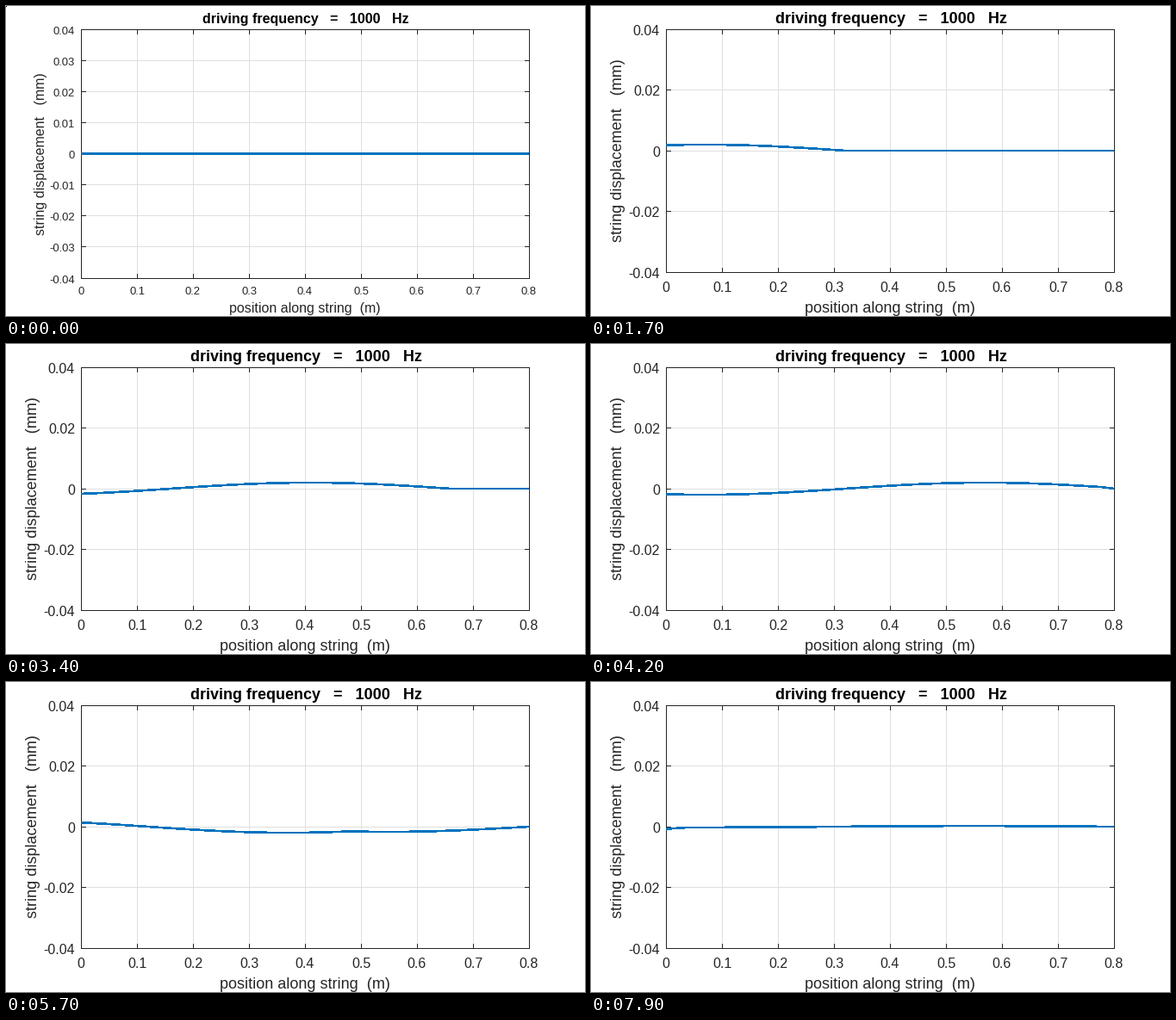
A matplotlib script for the animation above (8 s loop, 672 by 360 pixels).

```python
import numpy as np
import matplotlib.pyplot as plt
from matplotlib.animation import FuncAnimation

plt.rcParams["font.family"] = "Liberation Sans"
plt.rcParams["path.simplify"] = False

W, H, DPI = 672, 360, 96
PT = 72 / DPI                       # points per pixel
LEFT, RIGHT, TOP = 87, 607, 27
INK, GRID, BLUE = "#262626", "#dfdfdf", "#0072bd"

LENGTH, STEP = 0.8, 0.02            # string length, distance travelled per frame (m)
AMP, PERIOD = 0.002, 50             # drive amplitude (mm), period in frames
Y_MAX = 0.04
HALF_WIDTH = 4 / 3                  # half the string's line width in pixels
FRAMES, INTERVAL = 80, 100

fig = plt.figure(figsize=(W / DPI, H / DPI), dpi=DPI, facecolor="white")
ax = fig.add_axes([0, 0, 1, 1])
ax.set(xlim=(0, W), ylim=(H, 0))
ax.axis("off")


def segment(x, y, color, z):
    """One-pixel line between two pixels, both included."""
    return ax.plot(np.add(x, 0.5), np.add(y, 0.5), color=color, lw=PT, zorder=z,
                   snap=False, solid_capstyle="projecting")[0]


def label(x, y, s, size, color=INK, **kw):
    kw = {"ha": "center", "va": "baseline", **kw}
    return ax.text(x, y, s, fontsize=size * PT, color=color, zorder=5, **kw)


def build_axes(bottom, dy, tick_size, label_size, tick_y, label_y, ylabel_x):
    """Draw the full set of axes and return its artists."""
    parts = []
    mid = (TOP + bottom) / 2
    scale = (bottom - TOP) / (2 * Y_MAX)

    for k in range(9):
        x = LEFT + 65 * k
        parts += [segment([x, x], [TOP, bottom], GRID, 1),
                  segment([x, x], [TOP, TOP + 5], INK, 2),
                  segment([x, x], [bottom - 5, bottom], INK, 2),
                  label(x, tick_y, f"{k / 10:g}", tick_size)]

    n = round(Y_MAX / dy)
    for k in range(-n, n + 1):
        y = int(np.floor(mid - k * dy * scale))
        parts += [segment([LEFT, RIGHT], [y, y], GRID, 1),
                  segment([LEFT, LEFT + 5], [y, y], INK, 2),
                  segment([RIGHT - 5, RIGHT], [y, y], INK, 2),
                  label(80, y + round(0.36 * tick_size) + 1,
                        f"{k * dy:g}", tick_size, ha="right")]

    for x in (LEFT, RIGHT):
        parts.append(segment([x, x], [TOP, bottom], INK, 2))
    for y in (TOP, bottom):
        parts.append(segment([LEFT, RIGHT], [y, y], INK, 2))

    parts += [label(348, 20, "driving frequency   =   1000   Hz", label_size,
                    "black", weight="bold"),
              label(347, label_y, "position along string  (m)", label_size),
              label(ylabel_x, mid, "string displacement   (mm)", label_size,
                    rotation=90, rotation_mode="anchor")]
    return parts


opening = build_axes(316, 0.01, 13, 16, 335, 356, 45)
opening.append(ax.add_patch(plt.Rectangle((0, 0), 1, 1, color="black", lw=0)))
running = build_axes(309, 0.02, 16, 18, 332, 356, 36)

# The string is drawn without smoothing, one column of whole pixels at a time.
edges = np.arange(LEFT, RIGHT + 1)
columns = edges[:-1] + 0.5
pos = np.linspace(0, LENGTH, 41)
pos_px = LEFT + pos / LENGTH * (RIGHT - LEFT)
string = ax.stairs(0 * columns, edges, baseline=0 * columns, fill=True,
                   color=BLUE, lw=0, zorder=3, snap=False)
ax.set(xlim=(0, W), ylim=(H, 0))


def drive(t):
    return np.where(t > 0, AMP * np.sin(2 * np.pi * t / PERIOD), 0)


def displacement(t):
    """Outgoing wave plus its inverted reflection from the fixed end."""
    return drive(t - pos / STEP) - drive(t - (2 * LENGTH - pos) / STEP)


def update(i):
    first = i == 0
    for part in opening:
        part.set_visible(first)
    for part in running:
        part.set_visible(not first)
    bottom = 316 if first else 309
    scale = (bottom - TOP) / (2 * Y_MAX)
    y = (TOP + bottom) / 2 - displacement(i - 1) * scale
    y = np.interp(columns, pos_px, y)
    string.set_data(values=np.round(y + HALF_WIDTH), edges=edges,
                    baseline=np.round(y - HALF_WIDTH))
    return [string]


anim = FuncAnimation(fig, update, frames=FRAMES, interval=INTERVAL,
                     repeat=True, repeat_delay=0, blit=False)
plt.show()
```
